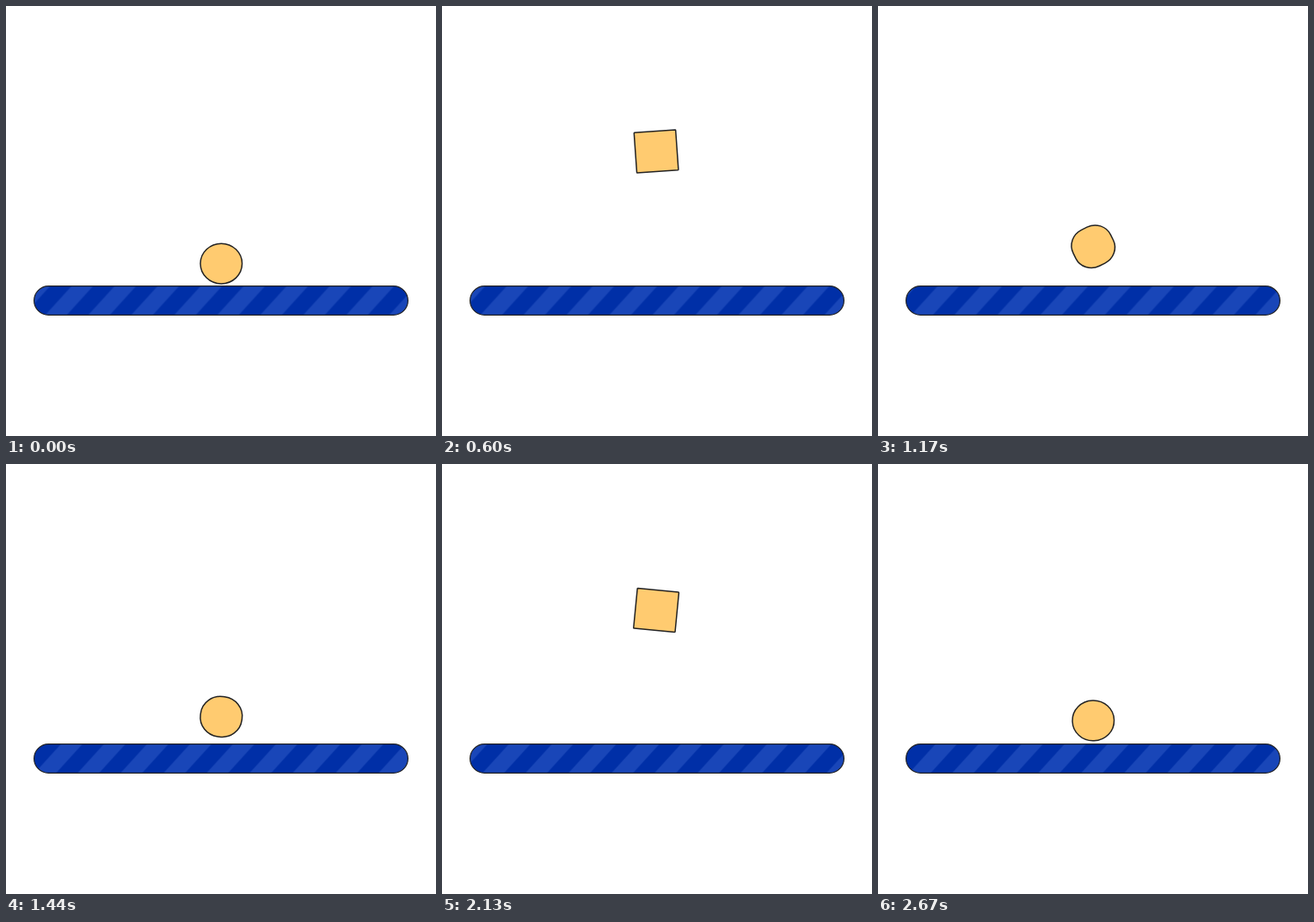
Animation, 500 px wide and 500 px high, one loop 2700 ms. Source, as an HTML page:

```html
<!DOCTYPE html>
<html lang="en">
<head>
<meta charset="utf-8">
<title>Bouncing ball</title>
<style>
  html, body { margin: 0; width: 100%; height: 100%; overflow: hidden; background: #fff; }
  svg { display: block; width: 100%; height: 100%; }
</style>
</head>
<body>
<svg viewBox="0 0 500 500">
  <defs>
    <clipPath id="barShape"><rect x="32.6" y="325.6" width="434.8" height="33.8" rx="16.9"/></clipPath>
    <pattern id="stripes" width="50" height="34" patternUnits="userSpaceOnUse">
      <rect width="50" height="34" fill="#002fa7"/>
      <path d="M0 34L31 0H56L25 34ZM-50 34L-19 0H6L-25 34Z" fill="#1946b8"/>
    </pattern>
  </defs>
  <g clip-path="url(#barShape)">
    <g id="belt"><rect x="-50" y="0" width="600" height="34" fill="url(#stripes)"/></g>
  </g>
  <rect x="32.6" y="325.6" width="434.8" height="33.8" rx="16.9" fill="none" stroke="#222" stroke-width="1.2"/>
  <rect id="ball" x="-23.65" y="-23.4" width="48.5" height="46.8" fill="#ffcb70" stroke="#222" stroke-width="1.5"/>
</svg>
<script>
  const LOOP = 2700, STEP = 30, STEP_TIME = 33, HALF_BOUNCE = 750;
  const ball = document.getElementById('ball');
  const belt = document.getElementById('belt');

  // Cubic bezier easing with flat ends, solved by bisection
  function ease(u, x1, x2) {
    let lo = 0, hi = 1, s = 0.5;
    for (let i = 0; i < 24; i++) {
      s = (lo + hi) / 2;
      const x = 3 * x1 * s * (1 - s) ** 2 + 3 * x2 * s * s * (1 - s) + s ** 3;
      if (x < u) lo = s; else hi = s;
    }
    return s * s * (3 - 2 * s);
  }

  function draw(now) {
    const time = Math.floor((now % LOOP) / STEP) * STEP_TIME;

    const phase = ((time + 9) / HALF_BOUNCE) % 2;
    const rising = phase < 1;
    const turn = rising ? ease(phase, 0.34, 0.58) : 1 + ease(phase - 1, 0.47, 0.55);
    const height = rising ? turn : 2 - turn;
    ball.setAttribute('transform', `translate(249.7 ${299.6 - 133.6 * height}) rotate(${180 * turn})`);
    ball.setAttribute('rx', 24.25 * (1 - height));
    ball.setAttribute('ry', 23.4 * (1 - height));

    belt.setAttribute('transform', `translate(${(45.5 + time * 0.15) % 50} 325.5)`);
    requestAnimationFrame(draw);
  }
  requestAnimationFrame(draw);
</script>
</body>
</html>
```
